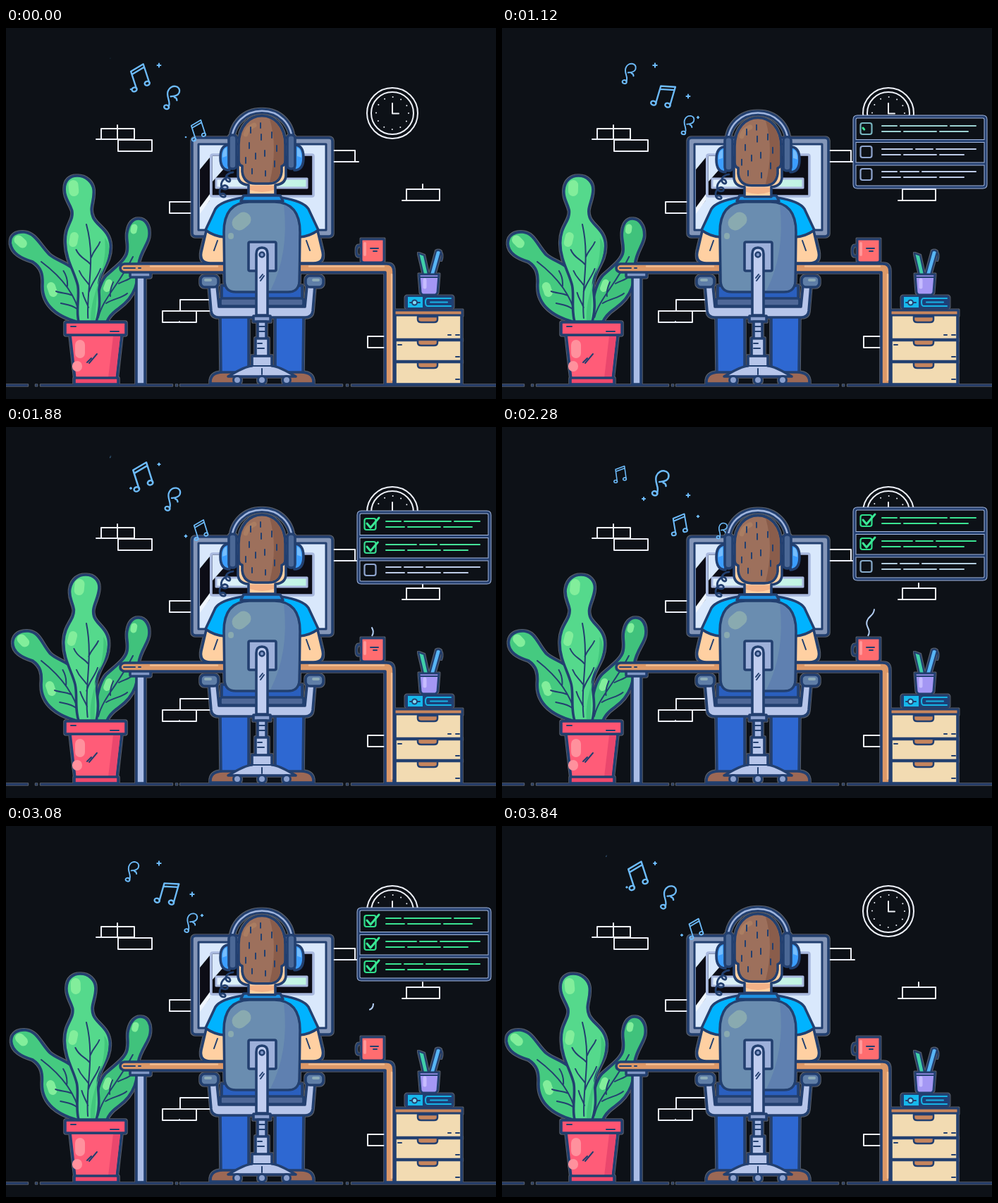
An HTML page that plays this animation: 695x527 px, repeating every 3.88 s.

```html
<!DOCTYPE html>
<html lang="en">
<head>
<meta charset="utf-8">
<title>At the desk</title>
<style>
  html, body { margin: 0; width: 100%; height: 100%; overflow: hidden; background: #0d1117; }
  svg { display: block; }
  path, rect, circle, ellipse { stroke-linecap: round; stroke-linejoin: round; }
  #wall, #clock { fill: none; stroke: #eef1f8; stroke-width: 2; }
  #scene { stroke: #243f6f; stroke-width: 3.6; }
  #scene .flat { stroke: none; }
  #scene .thin { stroke-width: 2; fill: none; }
  .leaf .shine { stroke: #82ee9b; fill: none; }
  #notes g { fill: none; stroke: #6dbbfa; stroke-width: 2.6; }
  #notes ellipse { fill: #4da6f5; }
  #sparks { stroke: #6dbbfa; stroke-width: 2; }
  #panel { fill: none; }
  #steam { fill: none; stroke: #b4cff4; stroke-width: 2; stroke-linecap: butt; }
</style>
</head>
<body>
<svg width="695" height="527" viewBox="0 0 695 527">
  <defs>
    <filter id="halo" x="0" y="0" width="695" height="527" filterUnits="userSpaceOnUse">
      <feMorphology in="SourceAlpha" operator="dilate" radius="1"/>
      <feComposite in2="SourceAlpha" operator="out" result="edge"/>
      <feFlood flood-color="#c3d3ee" flood-opacity=".4"/>
      <feComposite in2="edge" operator="in"/>
      <feMerge><feMergeNode/><feMergeNode in="SourceGraphic"/></feMerge>
    </filter>
    <linearGradient id="bar"><stop stop-color="#e2effd"/><stop offset="1" stop-color="#bff5e2"/></linearGradient>
    <g id="double">
      <path d="M-9,15V-13L13,-18V12M-9,-8L13,-13"/>
      <ellipse cx="-12.500" cy="15.500" rx="4" ry="3.200"/><ellipse cx="9.500" cy="12.500" rx="4" ry="3.200"/>
    </g>
    <g id="single" transform="translate(-3 0) rotate(12)">
      <path d="M1,8C4,-1 -7,-7 -5,-17C-3,-29 14,-30 13,-18C12,-11 4,-10 1,-9M7,-9Q11,-9 12,-5"/>
      <ellipse cx="-2" cy="9" rx="4" ry="3.200"/>
    </g>
  </defs>

  <path id="wall" d="M135,143h47v15h-47zM128,158h30v-20M159,159h48v16h-48zM455,174h40v16h-35M495,190h5
    M568,229h47v16h-53M568,229v16M591,222v7M270,247h-38v16h38M295,386h-48v16h48M222,402h48v16h-48zM246,418v-1M545,438h-32v16h32"/>
  <g id="clock">
    <circle cx="548" cy="121" r="36"/><circle cx="548" cy="121" r="30"/>
    <circle cx="548" cy="121" r="23" stroke-dasharray="0 12.043"/>
    <path d="M548,107V121.500H557"/>
  </g>

  <g id="scene" filter="url(#halo)">
    <path d="M0,507.500H30M43,507.500h.1M50,507.500H235M242,507.500h.1M248,507.500H476M484,507.500h.1M491,507.500H695" stroke-width="2.600"/>

    <!-- monitor -->
    <rect x="264" y="156" width="199" height="140" rx="5" fill="#8496b8"/>
    <rect x="273" y="165" width="181" height="122" fill="#d9e8fc" stroke-width="3"/>
    <path class="flat" d="M275,201L289,184V245L275,262z" fill="#0d1117"/>
    <path class="flat" d="M275,255L289,236V245L275,264z" fill="#f0f6ff"/>
    <rect x="291" y="180" width="145" height="59" rx="2" fill="#0d1117" stroke="#a9b9df"/>
    <path class="flat" d="M293,182h32l-32,36z" fill="#d9e8fc"/>
    <rect x="298" y="214" width="129" height="13" fill="url(#bar)" stroke="#a9b9df" stroke-width="3"/>

    <!-- plant -->
    <g class="leaf" data-top="290" data-sway="3" data-lag="0">
      <path fill="#45ca80" d="M100,417C75,410 50,395 51,365C52,350 50,340 38,332C22,327 9,320 8,306C8,294 18,289 29,290C45,292 49,308 62,322C75,334 100,335 103,360C105,380 108,400 112,417Z"/>
      <path class="shine" stroke-width="13" d="M20,301L25,306"/><path class="shine" stroke-width="12" d="M63,367L66,376"/>
      <path class="thin" d="M105,411C99,380 80,355 50,332M93,380C86,376 77,377 70,374M86,367C87,358 84,350 81,345M100,399C92,393 84,393 77,391"/>
    </g>
    <g class="leaf" data-top="271" data-sway="3" data-lag="1">
      <path fill="#3fc27c" d="M122,417C128,395 130,365 142,352C155,340 170,330 172,318C174,305 170,300 172,290C174,278 180,271 188,271C198,271 204,282 203,294C203,305 190,318 188,335C187,360 185,380 160,398C150,405 145,412 143,417Z"/>
      <path class="shine" stroke-width="9" d="M182,283L181,288"/><path class="shine" stroke-width="10" d="M146,362L143,370"/>
      <path class="thin" d="M131,411C137,385 160,365 180,325M148,381C147,372 150,366 152,361M142,391C153,384 164,384 172,377M160,363C167,359 174,358 178,354"/>
    </g>
    <g class="leaf" data-top="210" data-sway="6" data-lag="0">
      <path fill="#55d98c" d="M103,417C98,400 103,382 100,366C96,348 83,330 83,305C83,280 97,275 95,259C92,247 86,242 87,230C88,216 97,210 107,210C119,210 128,219 128,230C128,246 119,255 124,269C128,281 147,287 147,310C147,332 132,343 130,362C129,378 135,392 128,417Z"/>
      <path fill="#43c67d" class="flat" d="M120,415C118,375 143,345 139,298C148,308 145,325 137,341C127,362 128,378 126,415Z"/>
      <path class="shine" stroke-width="14" d="M100,223L100,232"/><path class="shine" stroke-width="12" d="M96,296L94,305"/>
      <path class="thin" d="M116,412C112,370 126,330 114,279M118,336C112,328 103,327 98,315M119,326C123,315 129,312 132,304M116,365C110,356 106,355 102,345M116,375C120,361 128,354 132,342M116,397C112,387 109,384 107,376"/>
    </g>
    <path d="M91,436H164L157,499H98z" fill="#ff5c78"/>
    <path class="flat" d="M152,438H162L155,497H145z" fill="#ea476d"/>
    <rect x="84" y="418" width="86" height="18" rx="2" fill="#ff5573"/>
    <rect x="97" y="497" width="62" height="9" rx="2" fill="#ef4a6c"/>
    <path d="M105,450v12M101,480v1" stroke="#ff919d" stroke-width="14"/>
    <path class="thin" d="M115,475l6,-6M118,476l11,-13M92,424h7M148,431h12"/>

    <!-- person below the desk -->
    <rect x="306" y="366" width="114" height="30" fill="#2c5fbe"/>
    <g id="leg">
      <path d="M304,408H344V490H305z" fill="#2f68d2"/>
      <path d="M290,505Q289,489 308,489H332V505z" fill="#9c6755"/>
    </g>
    <use href="#leg" transform="matrix(-1 0 0 1 726 0)"/>

    <!-- arms and shirt -->
    <g id="arm">
      <path d="M284,288L277,318Q274,334 290,334H310V296z" fill="#ffd0a2"/>
      <path class="thin" d="M300,302l-5,14"/>
    </g>
    <use href="#arm" transform="matrix(-1 0 0 1 726 0)"/>
    <path d="M335,241Q304,246 297,257L283,287Q295,296 310,297H416Q431,296 443,287L429,257Q422,246 391,241z" fill="#06b3ff"/>
    <path d="M337,238H389L393,246H333z" fill="#1b8fe0"/>

    <g id="head">
      <path d="M329,185V210Q330,222 344,223V237H382V223Q396,222 397,210V185z" fill="#ffd0a2"/>
      <path class="flat" d="M346,224H380V230Q363,236 346,230z" fill="#f2b187"/>
      <path d="M320,165C318,102 408,102 406,165" fill="none" stroke-width="8"/>
      <path d="M320,165C318,102 408,102 406,165" fill="none" stroke="#9fb5de" stroke-width="2.600"/>
      <path d="M330,166C330,111 396,111 396,166V188Q396,195 391,196V204Q389,221 372,221H354Q337,221 335,204V196Q330,195 330,188z" fill="#9d705b"/>
      <path class="flat" d="M374,129Q394,138 394,168V188Q394,194 389,195V204Q387,219 374,219Q386,170 374,129z" fill="#8a5d4b"/>
      <path d="M352,138q-10,4 -12,13" fill="none" stroke="#aa7d62" stroke-width="7"/>
      <path class="thin" stroke-width="1.800" d="M347,141v8M361,135v7M362,151v8M377,148v8M345,163v8M340,184v8M354,178v8M367,174v8M384,167v8M349,200v7M368,203v7M381,189v8"/>
      <g id="phone">
        <path d="M317,166Q304,166 304,184Q304,202 317,202z" fill="#3b9dff"/>
        <path class="flat" d="M307,184q0,-13 6,-14v12z" fill="#74bdff"/>
        <rect x="316" y="152" width="11" height="48" rx="5" fill="#4b6896"/>
      </g>
      <use href="#phone" transform="matrix(-1 0 0 1 726 0)"/>
      <path d="M322,205C311,206 309,216 315,218S317,208 310,214S304,229 311,229S313,220 307,225S302,239 308,240S311,233 304,236" fill="none" stroke-width="2.800"/>
    </g>

    <!-- desk -->
    <rect x="185" y="350" width="12" height="156" fill="#aabde6"/>
    <rect x="176" y="345" width="29" height="9" rx="2" fill="#7f96c4"/>
    <path d="M168,335H540Q550,335 550,346V506H538V347H168Q162,346 162,341T168,335z" fill="#dc9867"/>
    <path d="M205,338.500H300M430,338.500H536M547,350V500" stroke="#f3bd90" stroke-width="2.500"/>
    <path class="thin" d="M167,341h16M188,341h3"/>

    <!-- chair -->
    <path d="M288,366L291,402Q292,411 302,411H424Q434,411 435,402L438,366H427L424,396H302L299,366z" fill="#b6c5ea"/>
    <rect x="304" y="384" width="118" height="11" rx="3" fill="#4f6898"/>
    <g id="rest"><rect x="276" y="352" width="25" height="16" rx="6" fill="#5e7ea7"/><path d="M283,358h7" stroke="#8dabb8" stroke-width="4"/></g>
    <use href="#rest" transform="matrix(-1 0 0 1 726 0)"/>
    <path d="M309,290Q309,248 345,247H381Q417,248 417,290L416,360Q415,375 400,375H326Q311,375 310,360z" fill="#6b8db0"/>
    <path class="flat" d="M394,251Q415,260 415,292L414,360Q413,373 400,373H375Q402,320 394,251z" fill="#5f80b0"/>
    <path d="M331,277l6,-5" stroke="#89aab0" stroke-width="21"/><path d="M319,295v1" stroke="#89aab0" stroke-width="8"/>
    <rect x="344" y="304" width="39" height="41" rx="2" fill="#9db0da"/>
    <path d="M355,408V321Q355,312 363,312T371,321V408z" fill="#c0cdf0"/>
    <circle cx="363" cy="322" r="3.500" fill="#7e95c6" stroke-width="2.500"/>
    <path class="thin" d="M360,355l4,-5M361,359l5,-7"/>
    <rect x="351" y="409" width="24" height="8" fill="#8ba0ce"/>
    <rect x="357" y="417" width="12" height="25" fill="#a9bbe5"/>
    <rect x="354" y="441" width="18" height="26" fill="#b9c8ec"/>
    <path class="thin" d="M357,424h12M357,431h12M357,448h6M357,455h9"/>
    <path d="M315,495Q340,480 349,480V466H377V480Q386,480 411,495z" fill="#b6c5ea"/>
    <path class="thin" d="M350,480H376M363,484v8"/>
    <g fill="#8ba0ce" stroke-width="3"><circle cx="328" cy="500" r="5.500"/><circle cx="363" cy="500" r="5.500"/><circle cx="398" cy="500" r="5.500"/></g>

    <!-- mug -->
    <path d="M504,309h-3q-4,0 -4,8t4,7h3" fill="none" stroke-width="3"/>
    <path d="M504,300H536V329Q536,333 532,333H508Q504,333 504,329z" fill="#ff6d70" stroke-width="3"/>
    <path d="M509,306v16" stroke="#ff999a" stroke-width="4"/>
    <path class="thin" d="M517,313h11M521,317h5"/>

    <!-- drawers -->
    <rect x="552" y="402" width="94" height="104" fill="#f2dbb2"/>
    <rect x="551" y="401" width="96" height="7" fill="#c9875d" stroke-width="3"/>
    <path d="M552,443H646M552,474H646" stroke-width="4.500"/>
    <path d="M584,410h28v4q0,4 -5,4h-18q-5,0 -5,-4zM584,443h28v4q0,4 -5,4h-18q-5,0 -5,-4zM584,475h28v4q0,4 -5,4h-18q-5,0 -5,-4z" fill="#c6855d" stroke-width="2.500"/>
    <path class="thin" d="M638,436h5M627,436h4M638,467h5M556,450h5M638,499h5"/>

    <!-- books and pencils -->
    <rect x="567" y="381" width="67" height="17" rx="3" fill="#1e4178" stroke-width="3"/>
    <path class="flat" d="M570,382H591V397H570z" fill="#16b8ec"/>
    <path class="thin" d="M573,390h3M583,390h4"/><circle cx="579.500" cy="390" r="3.500" fill="#7fdcf8" stroke-width="2"/>
    <path d="M631,384H598q-3,0 -3,5.500t3,5.500H631M602,389.500h24" fill="none" stroke="#19b4e6" stroke-width="2"/>
    <path d="M585,320L593,323L599,350H592z" fill="#41cfa9" stroke-width="2.200"/>
    <path d="M610,317q4,-3 7,1L608,350H601z" fill="#59b5f5" stroke-width="2.200"/>
    <path class="thin" d="M617,319q3,4 0,11"/>
    <path d="M586,350H614L612,375Q611,379 607,379H593Q589,379 588,375z" fill="#a497f4" stroke-width="3"/>
    <path d="M594,358v10" stroke="#c6bcff" stroke-width="5"/>
    <path class="thin" d="M587,354H613"/>
  </g>

  <path id="steam" pathLength="100" d="M519,297C525,287 514,284 518,275C520,268 527,269 528,259C528,240 508,240 508,255C509,264 521,263 521,252"/>
  <path id="track" fill="none" d="M316,152C290,150 268,146 252,139S238,120 236,112S228,88 214,77S182,74 167,67S152,52 148,43"/>
  <g id="sparks"></g>
  <g id="notes"></g>
  <g id="panel"></g>
</svg>
<script>
const LOOP = 3880, TAU = Math.PI * 2;
const $ = id => document.getElementById(id);
const mod = (a, n) => ((a % n) + n) % n;
const ramp = (t, from, to) => Math.min(1, Math.max(0, (t - from) / (to - from)));
const ease = u => u * u * (3 - 2 * u);

function add(parent, tag, attrs = {}) {
  const el = document.createElementNS('http://www.w3.org/2000/svg', tag);
  for (const name in attrs) el.setAttribute(name, attrs[name]);
  return parent.appendChild(el);
}

// Eased interpolation through [time, value] keys
function keyed(t, keys) {
  return keys.slice(1).reduce((v, [at, value], i) =>
    v + (value - keys[i][1]) * ease(ramp(t, keys[i][0], at)), keys[0][1]);
}

const leaves = [...document.querySelectorAll('.leaf')].map(g => ({
  top: +g.dataset.top, sway: +g.dataset.sway, lag: g.dataset.lag * Math.PI / 2,
  paths: [...g.children].map(el => [el, el.getAttribute('d')]),
}));

const notes = [['single', 510], ['double', 1480], ['single', 2450], ['double', 3420]].map(([shape, birth]) => {
  const el = add($('notes'), 'g');
  add(el, 'use', { href: '#' + shape });
  return { el, birth, swing: shape == 'double' ? -18 : 0 };
});

// x, y, phase of brightest moment, radius
const sparks = [[217, 53, .1, 3], [264, 97, .25, 3], [201, 102, .48, 3], [255, 155, .77, 3], [177, 87, .78, 2], [278, 127, .27, 1.5]]
  .map(([x, y, phase, r]) => ({ el: add($('sparks'), 'path'), x, y, phase, r }));

const panel = $('panel');
const frame = 'M504,126H682Q686,126 686,130V222Q686,226 682,226H504Q500,226 500,222V130Q500,126 504,126zM500,160.500H686M500,193H686';
add(panel, 'path', { d: frame, stroke: '#a3b6dc', 'stroke-width': 5, fill: '#0d1117' });
add(panel, 'path', { d: frame, stroke: '#243f6f', 'stroke-width': 3 });
const rows = [135, 168, 200].map((y, i) => {
  const box = add(panel, 'rect', { x: 508.5, y, width: 16, height: 16, rx: 3, 'stroke-width': 2.2 });
  const text = add(panel, 'path', {
    d: `M539,${y + 4}H${i == 1 ? 582 : 560}m5,0H${631 - 20 * i}m5,0H672M539,${y + 12}H565m5,0H616m5,0H${i ? 655 : 661}`,
    'stroke-width': 2,
  });
  const tick = add(panel, 'path', { d: `M512,${y + 7}l5,6l12,-14`, stroke: '#3be896', 'stroke-width': 3, pathLength: 100 });
  return { box, text, tick, start: 1060 + 600 * i };
});

const blend = (a, b, u) => `rgb(${a.map((v, i) => Math.round(v + (b[i] - v) * u))})`;

function draw(t) {
  const angle = TAU * t / LOOP;

  for (const { top, sway, lag, paths } of leaves) {
    const shift = -sway * Math.cos(angle - lag);
    for (const [el, d] of paths) {
      el.setAttribute('d', d.replace(/([\d.]+),([\d.]+)/g, (_, x, y) => {
        const u = (417 - y) / (417 - top);
        return `${(+x + shift * u * (3 * u - 2)).toFixed(2)},${y}`;
      }));
    }
  }

  $('head').setAttribute('transform', `translate(0 ${1.5 - 1.5 * Math.cos(2 * angle)})`);

  const track = $('track'), length = track.getTotalLength();
  for (const { el, birth, swing } of notes) {
    const age = mod(t - birth + 250, LOOP) - 250;
    const p = track.getPointAtLength(length * ramp(age, -250, 3250));
    const size = (.6 + .4 * ramp(age, 0, 2000) - ramp(age, 2300, 3400)) * ramp(age, -250, -180);
    const turn = swing * Math.cos(TAU * (age - 500) / 1900);
    el.setAttribute('transform', `translate(${p.x} ${p.y}) rotate(${turn}) scale(${Math.max(0, size)})`);
  }

  for (const { el, x, y, phase, r } of sparks) {
    const s = r * Math.max(0, Math.cos(4 * angle - TAU * phase));
    el.setAttribute('d', s > .1 ? `M${x - s},${y}h${2 * s}M${x},${y - s}v${2 * s}` : '');
  }

  const scale = ease(ramp(t, 180, 520)) * (1 - ease(ramp(t, 3340, 3700)));
  const lift = keyed(t, [[1480, 0], [2280, -10], [2760, -5], [3080, -8], [3700, 0]]);
  panel.setAttribute('transform', `translate(593 ${176 + lift}) scale(${scale}) translate(-593 -176)`);
  panel.style.display = scale ? '' : 'none';
  for (const { box, text, tick, start } of rows) {
    const done = ramp(t, start, start + 240), drawn = ramp(t, start + 40, start + 240);
    box.setAttribute('stroke', blend([143, 165, 207], [47, 224, 140], done));
    text.setAttribute('stroke', blend([190, 204, 232], [59, 228, 146], done));
    tick.setAttribute('stroke-dasharray', `${100 * drawn} 200`);
    tick.style.display = drawn ? '' : 'none';
  }

  const head = 100 * ramp(t, 1700, 3060), tail = 100 * ramp(t, 2340, 3160) ** 1.2;
  const steam = $('steam');
  steam.setAttribute('stroke-dasharray', `${Math.max(0, head - tail)} 300`);
  steam.setAttribute('stroke-dashoffset', -tail);
  steam.style.display = head > tail ? '' : 'none';
}

const begin = performance.now();
function tick() {
  draw((performance.now() - begin) % LOOP);
  requestAnimationFrame(tick);
}
tick();
</script>
</body>
</html>
```
